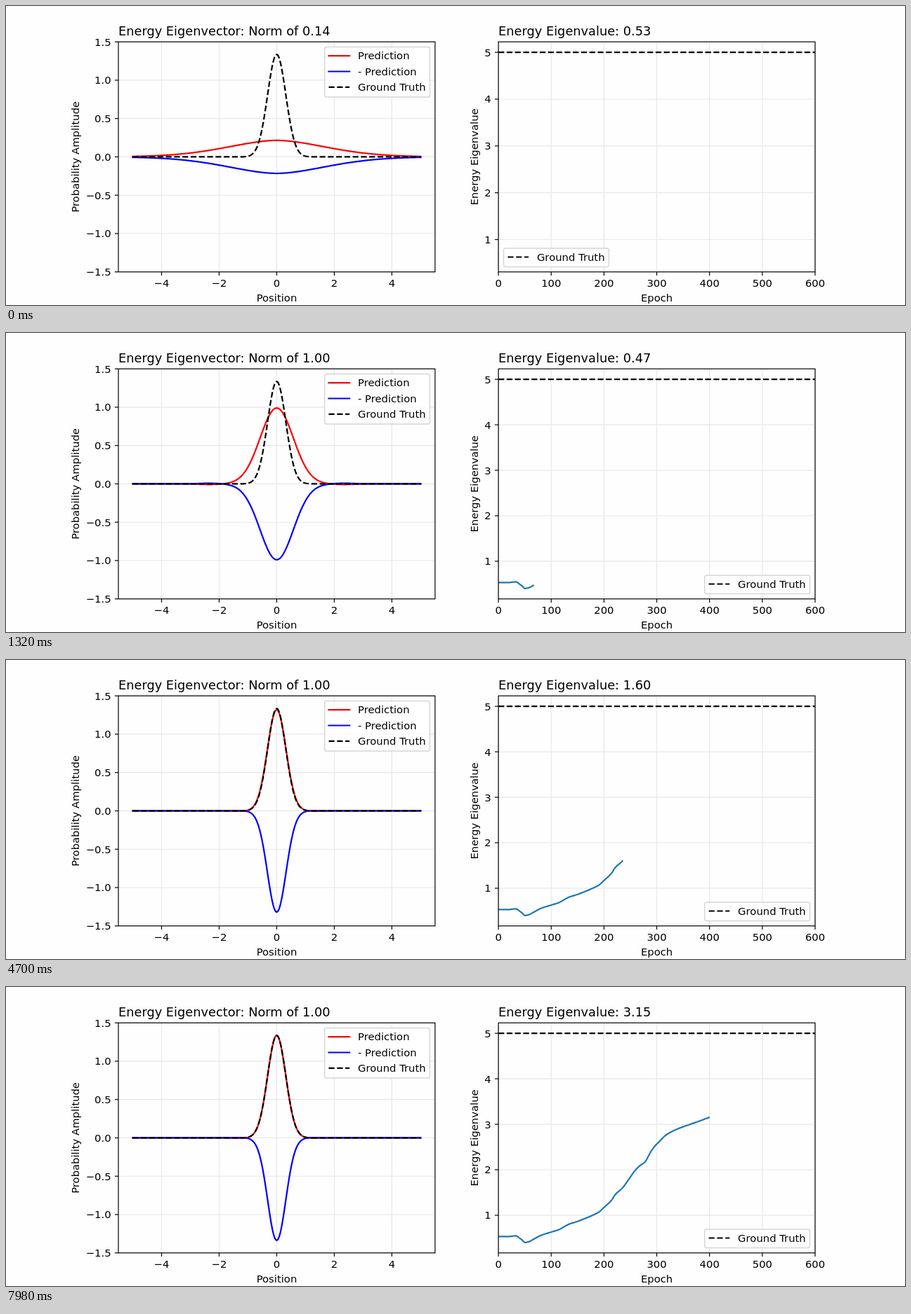
Recreate the animation shown at these times as an HTML page with a canvas. Size 1280 by 427 pixels, loop 8 s.

```html
<!DOCTYPE html>
<html lang="en">
<head>
<meta charset="utf-8">
<title>Energy eigenvalue training</title>
<style>
  html, body { margin: 0; width: 100%; height: 100%; overflow: hidden; background: #fefefe; }
  canvas { display: block; }
</style>
</head>
<body>
<canvas id="stage" width="1280" height="427"></canvas>
<script>
const ctx = document.getElementById('stage').getContext('2d');
const PT = 1280 / 864;          // one typographic point in pixels
const EM = 10 * PT;
const STEP = 20, EPOCHS = 400;
const TOP = 51.2, BOTTOM = 379.73;
const LEFT = { x0: 160, x1: 610.9 };
const RIGHT = { x0: 701.1, x1: 1152 };
const DASH = [3.7 * 1.5 * PT, 1.6 * 1.5 * PT];

// Monotone cubic through a flat list of x, y pairs.
function curve(...pairs) {
  const xs = pairs.filter((_, i) => i % 2 === 0);
  const ys = pairs.filter((_, i) => i % 2 === 1);
  const last = xs.length - 1;
  const d = xs.slice(1).map((x, i) => (ys[i + 1] - ys[i]) / (x - xs[i]));
  const m = xs.map((_, i) => {
    if (i === 0) return d[0];
    if (i === last) return d[last - 1];
    const a = d[i - 1], b = d[i];
    return a * b <= 0 ? 0 : 2 * a * b / (a + b);
  });
  return x => {
    let i = 0;
    while (i < last - 1 && x > xs[i + 1]) i++;
    const h = xs[i + 1] - xs[i], u = (x - xs[i]) / h, v = 1 - u;
    return ys[i] * (1 + 2 * u) * v * v + m[i] * h * u * v * v
      + ys[i + 1] * u * u * (3 - 2 * u) - m[i + 1] * h * u * u * v;
  };
}

const energy = curve(
  0, 0.532, 18, 0.53, 27, 0.541, 33, 0.548, 36, 0.536, 38, 0.516, 45, 0.455, 50, 0.402,
  58, 0.42, 67, 0.475, 80, 0.555, 100, 0.63, 114, 0.682, 134, 0.805, 149, 0.86, 158, 0.9,
  185, 1.035, 191, 1.075, 199, 1.16, 215, 1.34, 221, 1.45, 235, 1.6, 247, 1.79, 259, 1.985,
  268, 2.09, 277, 2.165, 290, 2.42, 298, 2.54, 304, 2.61, 316, 2.75, 334, 2.87,
  350, 2.945, 376, 3.05, 399, 3.15);
const norm = curve(0, 0.142, 10, 0.31, 20, 0.61, 28, 0.85, 33, 0.95, 38, 0.99, 45, 1, 399, 1);
const sigma = curve(
  0, 1.73, 10, 1.52, 20, 1.26, 30, 1.02, 38, 0.876, 50, 0.7, 70, 0.555, 100, 0.436,
  130, 0.39, 158, 0.361, 235, 0.324, 304, 0.316, 399, 0.316);

const values = Array.from({ length: EPOCHS }, (_, n) => energy(n));
const truth = x => Math.pow(10 / Math.PI, 0.25) * Math.exp(-5 * x * x);

function prediction(n) {
  const s = sigma(n), ramp = Math.min(1, n / 38);
  const amp = Math.sqrt(norm(n) / (s * Math.sqrt(Math.PI)));
  const power = 1.8 + 0.2 * ramp;
  const lobe = 0.0137 * s * ramp;
  return x => {
    const r = Math.abs(x);
    return amp * Math.exp(-Math.pow(r / (s * Math.SQRT2), power))
      - lobe * Math.exp(-Math.pow((r - 4 * s) / (0.95 * s), 2));
  };
}

function text(str, x, y, align = 'left', size = 10) {
  ctx.font = `${size * PT}px "DejaVu Sans", sans-serif`;
  ctx.textAlign = align;
  ctx.fillStyle = '#000';
  ctx.fillText(str, x, y);
}

function sideText(str, x) {
  ctx.save();
  ctx.translate(x, (TOP + BOTTOM) / 2);
  ctx.rotate(-Math.PI / 2);
  text(str, 0, 0, 'center');
  ctx.restore();
}

function path(points, color, { width = 1.5, dash = [], cap = 'butt' } = {}) {
  ctx.beginPath();
  for (const [x, y] of points) ctx.lineTo(x, y);
  ctx.strokeStyle = color;
  ctx.lineWidth = width * PT;
  ctx.lineCap = cap;
  ctx.lineJoin = 'round';
  ctx.setLineDash(dash);
  ctx.stroke();
  ctx.setLineDash([]);
}

const solid = (points, color) => path(points, color, { cap: 'square' });
const dashed = points => path(points, '#000', { dash: DASH });
const thin = (points, color) => path(points, color, { width: 0.8 });

function grid(ax, xTicks, yTicks, px, py) {
  for (const v of xTicks) thin([[px(v), TOP], [px(v), BOTTOM]], '#e7e7e7');
  for (const v of yTicks) thin([[ax.x0, py(v)], [ax.x1, py(v)]], '#e7e7e7');
}

function frame(ax, xTicks, yTicks, px, py, digits) {
  const sign = s => s.replace('-', '\u2212');
  for (const v of xTicks) {
    thin([[px(v), BOTTOM], [px(v), BOTTOM + 3.5 * PT]], '#000');
    text(sign(String(v)), px(v), 401.4, 'center');
  }
  for (const v of yTicks) {
    thin([[ax.x0, py(v)], [ax.x0 - 3.5 * PT, py(v)]], '#000');
    text(sign(v.toFixed(digits)), ax.x0 - 7 * PT, py(v) + 5.5, 'right');
  }
  ctx.strokeStyle = '#000';
  ctx.lineWidth = 0.8 * PT;
  ctx.lineJoin = 'miter';
  ctx.strokeRect(ax.x0, TOP, ax.x1 - ax.x0, BOTTOM - TOP);
}

function legend(x, y, w, h, rows) {
  ctx.beginPath();
  ctx.roundRect(x, y, w, h, 0.2 * EM);
  ctx.fillStyle = 'rgba(255,255,255,0.8)';
  ctx.fill();
  ctx.strokeStyle = 'rgba(204,204,204,0.8)';
  ctx.lineWidth = PT;
  ctx.stroke();
  rows.forEach(([label, draw], i) => {
    const mid = y + 12.5 + i * 22.4, hx = x + 0.4 * EM;
    draw([[hx, mid], [hx + 2 * EM, mid]]);
    text(label, hx + 2.8 * EM, mid + 5.3);
  });
}

const red = p => solid(p, '#f00');
const blue = p => solid(p, '#00f');

function drawVector(n) {
  const px = v => 385.45 + v * 450.9 / 11;
  const py = v => (TOP + BOTTOM) / 2 - v * (BOTTOM - TOP) / 3;
  const xTicks = [-4, -2, 0, 2, 4];
  const yTicks = [-1.5, -1, -0.5, 0, 0.5, 1, 1.5];
  const trace = f => Array.from({ length: 401 }, (_, i) => {
    const x = i / 40 - 5;
    return [px(x), py(f(x))];
  });
  const psi = prediction(n);

  grid(LEFT, xTicks, yTicks, px, py);
  red(trace(psi));
  blue(trace(x => -psi(x)));
  dashed(trace(truth));
  frame(LEFT, xTicks, yTicks, px, py, 1);
  text(`Energy Eigenvector: Norm of ${norm(n).toFixed(2)}`, LEFT.x0, 42.3, 'left', 12);
  text('Position', 385.45, 421.8, 'center');
  sideText('Probability Amplitude', 104.4);
  legend(453.6, 58.6, 149.9, 71.4,
    [['Prediction', red], ['- Prediction', blue], ['Ground Truth', dashed]]);
}

function drawValue(n) {
  const shown = values.slice(0, n + 1);
  const low = Math.min(...shown);
  const span = (BOTTOM - TOP) / 1.1;
  const px = v => RIGHT.x0 + v * (RIGHT.x1 - RIGHT.x0) / 600;
  const py = v => TOP + span * (0.05 + (5 - v) / (5 - low));
  const xTicks = [0, 100, 200, 300, 400, 500, 600];
  const yTicks = [1, 2, 3, 4, 5];

  grid(RIGHT, xTicks, yTicks, px, py);
  if (n > 0) {
    ctx.save();
    ctx.beginPath();
    ctx.rect(RIGHT.x0, TOP, RIGHT.x1 - RIGHT.x0, BOTTOM - TOP);
    ctx.clip();
    solid(shown.map((v, i) => [px(i), py(v)]), '#1f77b4');
    ctx.restore();
  }
  dashed([[RIGHT.x0, py(5)], [RIGHT.x1, py(5)]]);
  frame(RIGHT, xTicks, yTicks, px, py, 0);
  text(`Energy Eigenvalue: ${values[n].toFixed(2)}`, RIGHT.x0, 42.3, 'left', 12);
  text('Epoch', (RIGHT.x0 + RIGHT.x1) / 2, 421.8, 'center');
  sideText('Energy Eigenvalue', 672);
  // The legend leaves the left corner once the line reaches it.
  legend(n < 10 ? 708.5 : 994.7, 346, 149.9, 26.4, [['Ground Truth', dashed]]);
}

function draw() {
  const n = Math.floor(performance.now() / STEP) % EPOCHS;
  ctx.fillStyle = '#fefefe';
  ctx.fillRect(0, 0, 1280, 427);
  drawVector(n);
  drawValue(n);
  requestAnimationFrame(draw);
}
draw();
</script>
</body>
</html>
```
